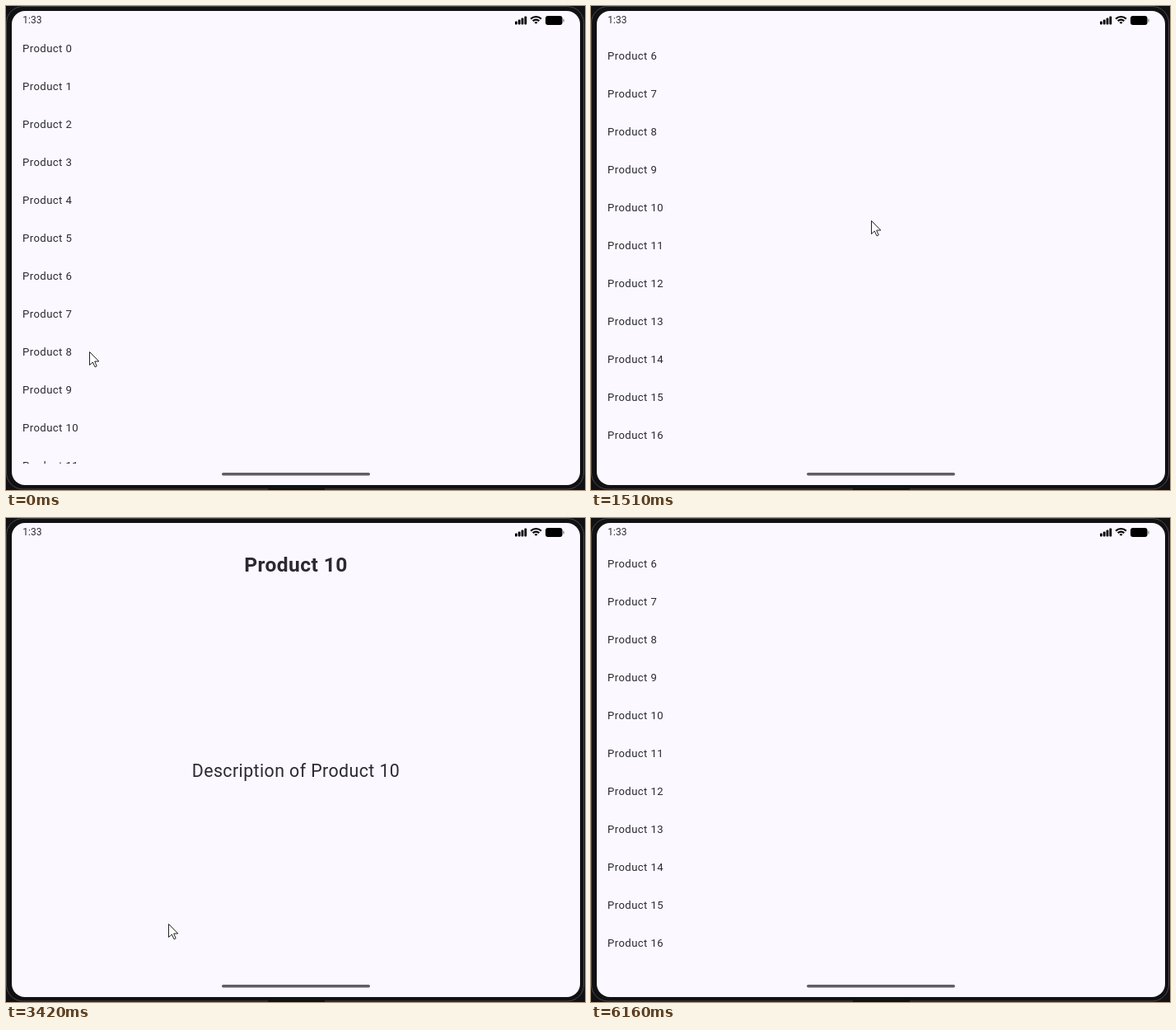
Recreate the animation shown at these times as an HTML page with a canvas. Size 703 by 587 pixels, loop 7660 ms.

```html
<!DOCTYPE html>
<html lang="en">
<head>
<meta charset="utf-8">
<title>Product list</title>
<style>
  html, body { margin: 0; width: 100%; height: 100%; overflow: hidden; background: #111113; }
  canvas { display: block; }
</style>
</head>
<body>
<canvas id="stage" width="703" height="587"></canvas>
<script>
const ctx = document.getElementById('stage').getContext('2d');
const LOOP = 7660, STEP = 91;
const INK = '#2b2a31', PAPER = '#fbf8ff', BEZEL = '#111113';
const ROW = 46, SPACING = 0.41;

// Where the pointer arrives, and when; each move takes at most MOVE ms.
const MOVE = 450;
const stops = [
  { at: 0, x: 101, y: 419 },
  { at: 960, x: 384, y: 390 },
  { at: 1240, x: 342, y: 254 },   // flick the list
  { at: 1860, x: 325, y: 297 },
  { at: 2330, x: 235, y: 245 },   // tap a row
  { at: 3240, x: 227, y: 532 },
  { at: 3424, x: 197, y: 492 },
  { at: 4150, x: 13, y: 366 },    // swipe back from the edge
  { at: 4516, x: 94, y: 357 },
  { at: 5240, x: 103, y: 355 },
  { at: 5510, x: 182, y: 416 },
  { at: 6070, x: 75, y: 419 }
];

function smooth(t, start, end) {
  const u = Math.min(1, Math.max(0, (t - start) / (end - start)));
  return u * u * (3 - 2 * u);
}

function pointerAt(t) {
  const next = stops.findIndex(s => s.at > t);
  if (next < 1) return stops[next < 0 ? stops.length - 1 : 0];
  const a = stops[next - 1], b = stops[next];
  const u = smooth(t, Math.max(a.at, b.at - MOVE), b.at);
  return { x: a.x + (b.x - a.x) * u, y: a.y + (b.y - a.y) * u };
}

// The drag speeds up, then the fling dies away.
function scrollAt(t) {
  if (t < 1240) return 120.3 * Math.max(0, (t - 1070) / 170) ** 2;
  return 272.3 - 152 * Math.exp((1240 - t) / 82);
}

function text(string, x, y, font, align = 'left', spacing = SPACING) {
  ctx.font = font + ' Roboto, sans-serif';
  ctx.letterSpacing = spacing + 'px';
  ctx.textAlign = align;
  ctx.fillStyle = INK;
  ctx.fillText(string, x, y);
}

function roundRect(x, y, w, h, r, color) {
  ctx.fillStyle = color;
  ctx.beginPath();
  ctx.roundRect(x, y, w, h, r);
  ctx.fill();
}

function drawDevice() {
  ctx.fillStyle = BEZEL;
  ctx.fillRect(0, 0, 703, 587);
  ctx.strokeStyle = '#48484b';
  ctx.lineWidth = 1;
  ctx.beginPath();
  ctx.roundRect(0.5, 0.5, 701, 585.5, 20);
  ctx.stroke();
  roundRect(318, 584, 69, 6, 2, BEZEL);
  roundRect(7, 6, 690, 575, 16, PAPER);
}

function drawStatus() {
  text('1:33', 20.3, 21, '12px', 'left', 0);
  for (let i = 0; i < 4; i++) {
    const h = 4 + i * 2;
    roundRect(618 + i * 3.8, 22.5 - h, 2.8, h, 1, '#000');
  }
  ctx.strokeStyle = '#000';
  ctx.lineWidth = 2.2;
  for (const r of [1.7, 5.4, 9]) {
    ctx.beginPath();
    ctx.arc(643.5, 22, r, -2.35, -0.79);
    ctx.stroke();
  }
  roundRect(655, 12, 20.5, 11, 3, '#000');
  roundRect(676.3, 15.5, 1.2, 4, 0.6, '#777');
  roundRect(262, 566, 180, 3.4, 1.7, '#605e66');
}

function drawList(scroll, alpha) {
  ctx.save();
  ctx.globalAlpha = alpha;
  ctx.beginPath();
  ctx.rect(7, 29, 690, 526);
  ctx.clip();
  for (let i = 0; i < 20; i++) {
    text('Product ' + i, 20, 56.3 + i * ROW - scroll, '13.14px');
  }
  ctx.restore();
}

function drawDetail(scale, alpha) {
  ctx.save();
  ctx.globalAlpha = alpha;
  ctx.translate(352, 293.5);
  ctx.scale(scale, scale);
  text('Product 10', 0, -228.6, 'bold 24.6px', 'center');
  text('Description of Product 10', 0, 20.3, '21.36px', 'center');
  ctx.restore();
}

function drawChevron(p) {
  ctx.save();
  ctx.globalAlpha = p;
  ctx.translate(31 + 8.5 * p, 311);
  ctx.scale(p, p);
  ctx.fillStyle = '#dde1f2';
  ctx.beginPath();
  ctx.arc(0, 0, 18.3, 0, 7);
  ctx.fill();
  ctx.strokeStyle = '#6b6d7c';
  ctx.lineWidth = 3;
  ctx.stroke(new Path2D('M3.2-7L-1.8 0L3.2 7'));
  ctx.restore();
}

const arrow = new Path2D('M.5 .5V16.5L4.3 13L7 18.8L9.2 17.8L6.7 12H11.8Z');

function drawPointer({ x, y }) {
  ctx.save();
  ctx.translate(Math.round(x), Math.round(y));
  ctx.fillStyle = '#fff';
  ctx.strokeStyle = '#222';
  ctx.lineWidth = 1;
  ctx.fill(arrow);
  ctx.stroke(arrow);
  ctx.restore();
}

function draw(t) {
  const opened = smooth(t, 2640, 3250);
  const pulled = smooth(t, 4516, 5220);
  const released = smooth(t, 5130, 5320);
  const chevron = pulled * (1 - smooth(t, 5244, 5430));

  drawDevice();
  drawStatus();
  if (chevron > 0) drawChevron(chevron);
  drawList(scrollAt(t), 1 - opened + pulled);
  if (t < 5500) drawDetail(1 - 0.13 * pulled - 0.17 * released, opened);
  if (t < 6150) drawPointer(pointerAt(t));
}

function tick(now) {
  const t = now % LOOP;
  draw(1240 + STEP * Math.floor((t - 1232) / STEP));
  requestAnimationFrame(tick);
}
tick(performance.now());
</script>
</body>
</html>
```
